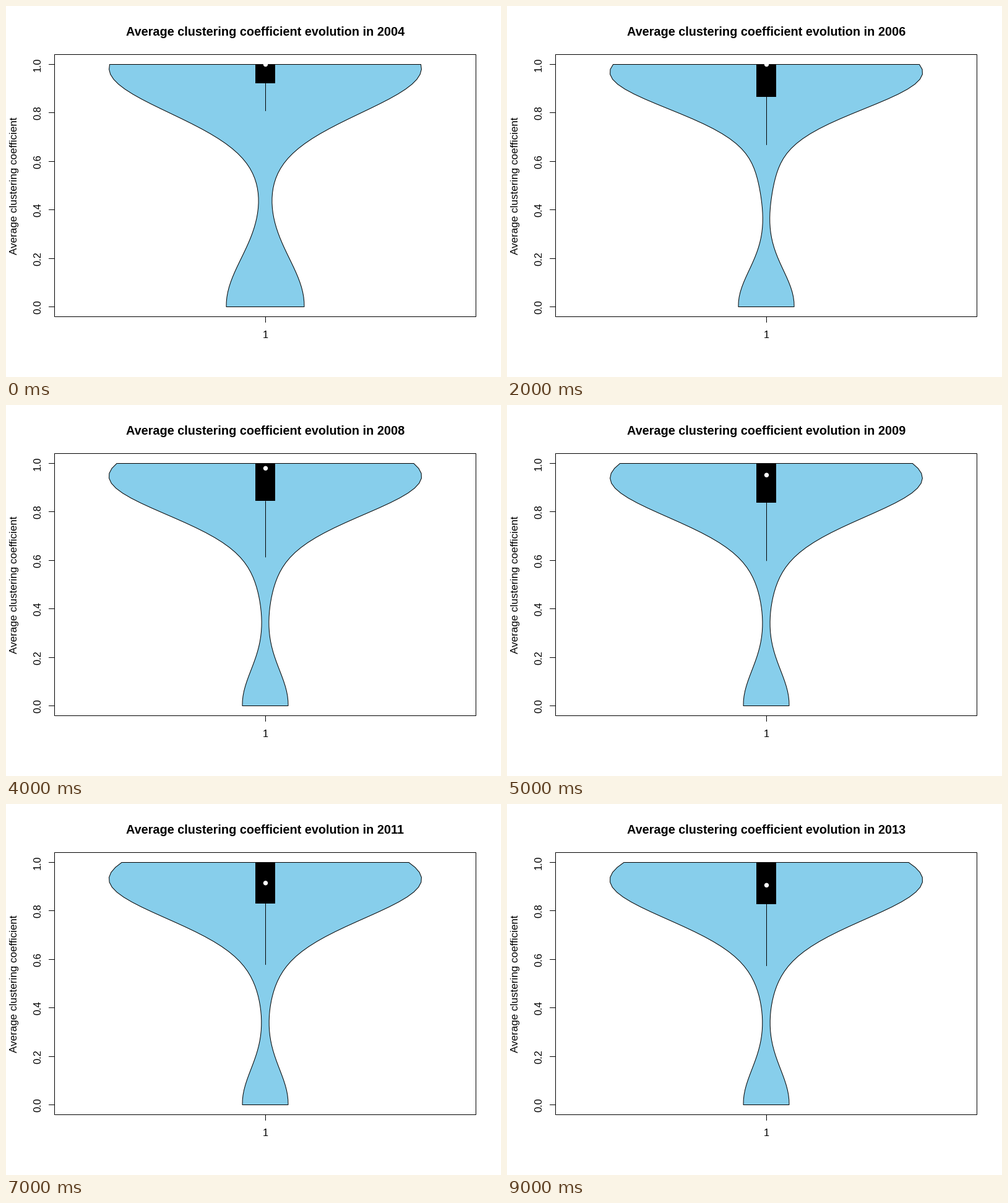
Recreate the animation shown at these times as a matplotlib script. Size 800x600 px, loop 10000 ms.

```python
import numpy as np
import matplotlib.pyplot as plt
from matplotlib.animation import FuncAnimation
from matplotlib.patches import Circle, Polygon, Rectangle

DPI = 100
PX = 72 / DPI  # points per pixel
CX, HALF = 419, 252.4
FIRST, COUNT = 2004, 10

plt.rcParams["font.family"] = "Liberation Sans"
fig = plt.figure(figsize=(8, 6), dpi=DPI, facecolor="white")
ax = fig.add_axes([0, 0, 1, 1])
ax.set(xlim=(0, 800), ylim=(600, 0))
ax.axis("off")


def to_y(v):
    return 486.5 - 392 * v


def bump(x, centre, spread):
    return np.exp(-((x - centre) / spread) ** 2 / 2)


def settle(t, start, end, span, power=1):
    """Ease from start towards end as the years pass."""
    return end + (start - end) * np.exp(-(t / span) ** power)


def half_width(v, t):
    """Density at value v: a top, a middle and a bottom bump."""
    top_spread = settle(t, .189, .165, .5) - .011 * bump(t, 2, 1.3)
    top = HALF * bump(v, settle(t, .984, .928, 4, 1.6), top_spread)
    mid = settle(t, 2.5, 11.7, 1) * bump(
        v, settle(t, .54, .59, 2), settle(t, .125, .155, 3, 2))
    low = settle(t, 63, 37, 1.88, 2.5) * bump(
        v, 0.005, settle(t, .198, .145, .95, 1.5))
    body = top + mid
    return body * HALF / body.max() + low


def outline(t):
    v = np.linspace(0, 1, 50)
    w = half_width(v, t)
    x = np.concatenate([CX - w, (CX + w)[::-1]])
    y = to_y(np.concatenate([v, v[::-1]]))
    return np.column_stack([x, y])


def quartile(t):
    return np.interp(t, [0, 1, 2, 4, 6, 8], [.923, .867, .867, .845, .833, .829])


def median(t):
    return np.interp(t, [2, 4, 6, 8], [1, .98, .924, .906])


def line(xs, ys, **kw):
    return ax.plot(xs, ys, color="black", lw=PX, snap=False,
                   solid_capstyle="butt", solid_joinstyle="miter", **kw)[0]


def label(x, y, s, size, **kw):
    return ax.text(x, y, s, fontsize=size * PX, ha="center", va="baseline",
                   rotation_mode="anchor", **kw)


violin = ax.add_patch(Polygon(outline(0), facecolor="#87CEEB",
                              edgecolor="black", lw=PX, snap=False, zorder=2))
whisker = line([419.5, 419.5], [94, 95], zorder=3)
box = ax.add_patch(Rectangle((403, 94), 32, 1, facecolor="black", lw=0,
                             zorder=4))
dot = ax.add_patch(Circle((419.5, 94.5), 3.7, facecolor="white", lw=0,
                          zorder=5))

ax.add_patch(Rectangle((78.5, 78.5), 681, 424, fill=False, edgecolor="black",
                       lw=PX, snap=False, zorder=6))
for v in np.linspace(0, 1, 6):
    line([69, 78], [np.floor(to_y(v)) + .5] * 2)
    label(56, to_y(v), f"{v:.1f}", 16.4, rotation=90)
line([419.5, 419.5], [503, 512])
label(419, 537, "1", 16.4)
label(18, 290.5, "Average clustering coefficient", 17, rotation=90)
title = label(419, 48, "", 19.85, weight="bold")


def draw(t):
    q1 = quartile(t)
    violin.set_xy(outline(t))
    box.set_height(round(to_y(q1)) - 94)
    whisker.set_ydata([to_y(q1), to_y(q1 - 1.5 * (1 - q1))])
    dot.center = (419.5, to_y(median(t)))
    title.set_text(f"Average clustering coefficient evolution in {FIRST + t}")
    return violin, whisker, box, dot, title


anim = FuncAnimation(fig, draw, frames=COUNT, interval=1000, repeat=True,
                     repeat_delay=0)
plt.show()
```
